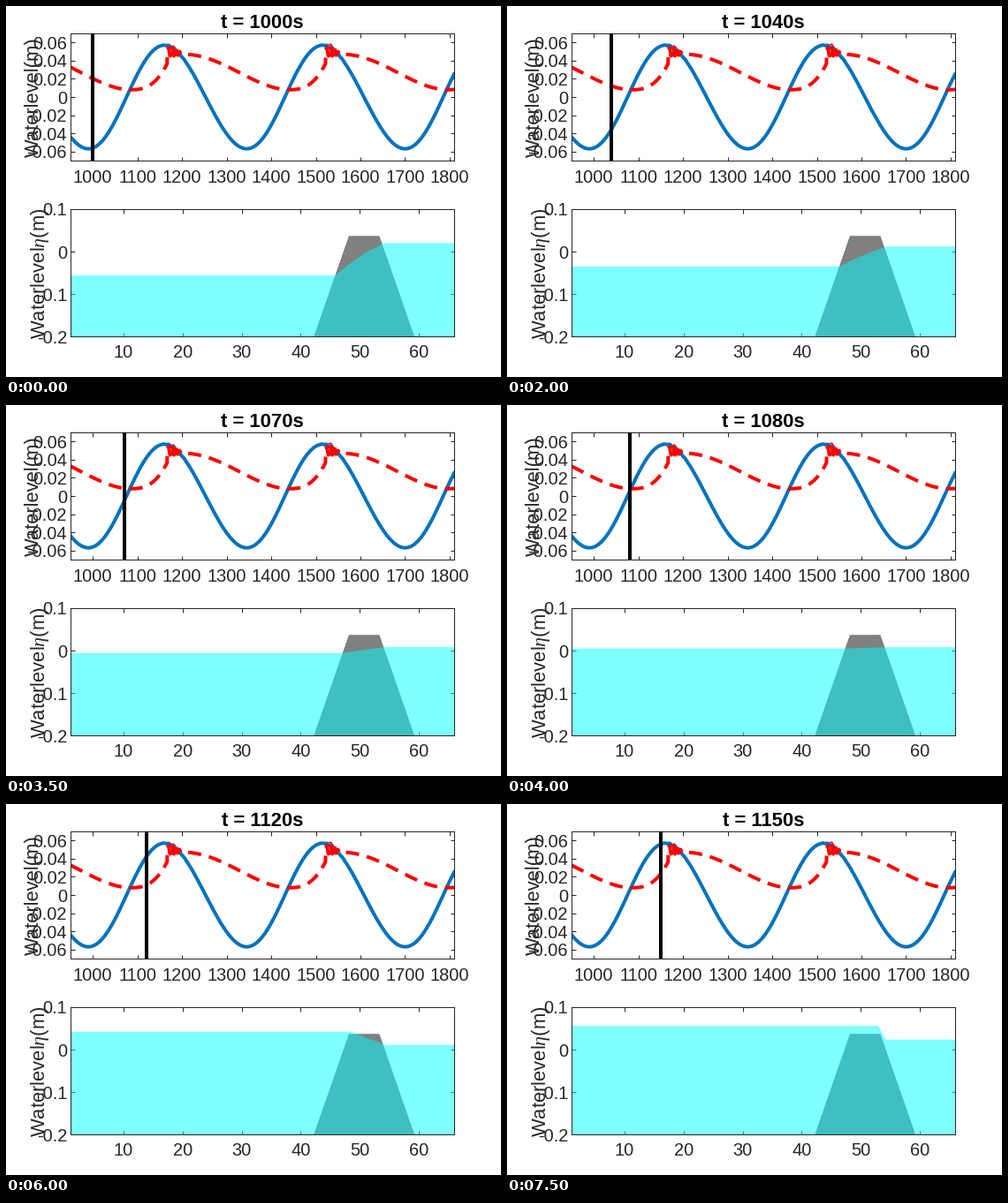
A matplotlib script that plays this animation: 560x420 px, repeating every 8000 ms.

```python
import numpy as np
import matplotlib.pyplot as plt
from matplotlib.animation import FuncAnimation

W, H, DPI = 560, 420, 80
PX = 72 / DPI  # points per pixel
INK = "#262626"
PERIOD = 355   # tide, seconds
BORE = 84      # delay from low water to the steep front behind the dam

plt.rcParams.update({
    "font.family": "Liberation Sans",
    "mathtext.fontset": "custom",
    "mathtext.rm": "Liberation Sans",
    "mathtext.it": "Liberation Serif:italic",
    "path.simplify": False,
})


def lag(t):
    """Seconds since the last low water behind the dam."""
    return (np.asarray(t, float) - 1083) % PERIOD


def sea_level(t):
    """Slightly skewed tide in front of the dam, with ripples past the crest."""
    phi = 2 * np.pi * (np.asarray(t, float) - 990) / PERIOD
    s = lag(t)
    ripple = 0.0009 * np.exp(-((s - 100) / 18) ** 2) * np.sin(s / 1.9)
    return -0.057 * np.cos(phi + 0.06 * (1 - np.cos(phi))) + ripple


def basin_level(t):
    """Slow rise, a steep front with decaying ripples, then a long fall."""
    s = lag(t)
    rise = 0.008 + 0.029 * (s / BORE) ** 2.8
    u = np.clip((s - 120) / (PERIOD - 120), 0, 1)
    fall = 0.008 + 0.039 * np.cos(np.pi / 2 * u) ** 1.8
    ripple = 0.004 + 0.006 * np.sin(2 * np.pi * (s - BORE) / 8.5)
    crest = fall + ripple * np.exp(-((s - 95) / 15) ** 2)
    return np.where(s < BORE, rise, crest)


def water_shape(t):
    """Outline of the water body: flat sea, slope through the dam, flat basin."""
    left, right = float(sea_level(t)), float(basin_level(t))
    if left < 0.036:
        x0 = 42.3 + 25 * (left + 0.2)
    else:
        x0 = np.interp(t, [1120, 1150], [48.4, 53.0])
    x1 = max(59.8 - 25 * (right + 0.2), x0 + 1.2)
    u = np.linspace(0, 1, 30)
    bend = 0.36 * np.clip((1120 - t) / 120, 0, 1)
    x = x0 + (x1 - x0) * u
    y = left + (right - left) * (u + bend * u * (1 - u))
    return np.column_stack([np.r_[1, 1, x, 66, 66],
                            np.r_[-0.2, left, y, right, -0.2]])


fig = plt.figure(figsize=(W / DPI, H / DPI), dpi=DPI, facecolor="white")


def make_axes(top, xlim, ylim, xticks, yticks):
    ax = fig.add_axes([73 / W, 1 - (top + 144) / H, 434 / W, 144 / H])
    ax.set(xlim=xlim, ylim=ylim)
    ax.set_xticks(xticks, [f"{v:g}" for v in xticks])
    ax.set_yticks(yticks, [f"{v:g}" for v in yticks])
    ax.set_axisbelow(True)
    ax.tick_params(direction="in", top=True, right=True, length=4.5 * PX,
                   width=PX, color=INK, labelcolor=INK, labelsize=20 * PX)
    ax.tick_params(axis="x", pad=9.5 * PX)
    ax.tick_params(axis="y", pad=4 * PX)
    for spine in ax.spines.values():
        spine.set(linewidth=PX, color=INK)
    return ax


def label(x, y, text, **style):
    return fig.text(x / W, 1 - y / H, text, ha="center", va="baseline",
                    rotation_mode="anchor", fontsize=22 * PX, **style)


series = make_axes(31, (950, 1810), (-0.07, 0.07),
                   range(1000, 1801, 100), [k / 50 for k in range(-3, 4)])
section = make_axes(230, (1, 66), (-0.2, 0.1),
                    range(10, 61, 10), [k / 10 for k in range(-2, 2)])

label(37, 103, "Waterlevel(m)", rotation=90, color=INK)
label(44, 302.5, r"Waterlevel$\eta$(m)", rotation=90, color=INK)
title = label(290, 25, "", weight="bold", color="black")

time = np.linspace(950, 1810, 1721)
series.plot(time, sea_level(time), color="#0072BD", lw=4 * PX)
series.plot(time, basin_level(time), color="red", lw=4 * PX,
            linestyle=(0, (3.75, 2.25)), dash_capstyle="butt")
cursor = series.axvline(1000, color="black", lw=4 * PX, zorder=3)

section.fill([42.3, 48.2, 53.3, 59.2], [-0.2, 0.036, 0.036, -0.2],
             facecolor="#808080", edgecolor="#606060", lw=0.5 * PX)
water, = section.fill([1, 66, 66], [-0.2, -0.2, 0],
                      facecolor="cyan", alpha=0.5, lw=0)


def update(i):
    t = 1000 + 10 * i
    title.set_text(f"t = {t}s")
    cursor.set_xdata([t, t])
    water.set_xy(water_shape(t))
    return title, cursor, water


anim = FuncAnimation(fig, update, frames=16, interval=500, repeat=True,
                     repeat_delay=0, blit=False)
plt.show()
```
